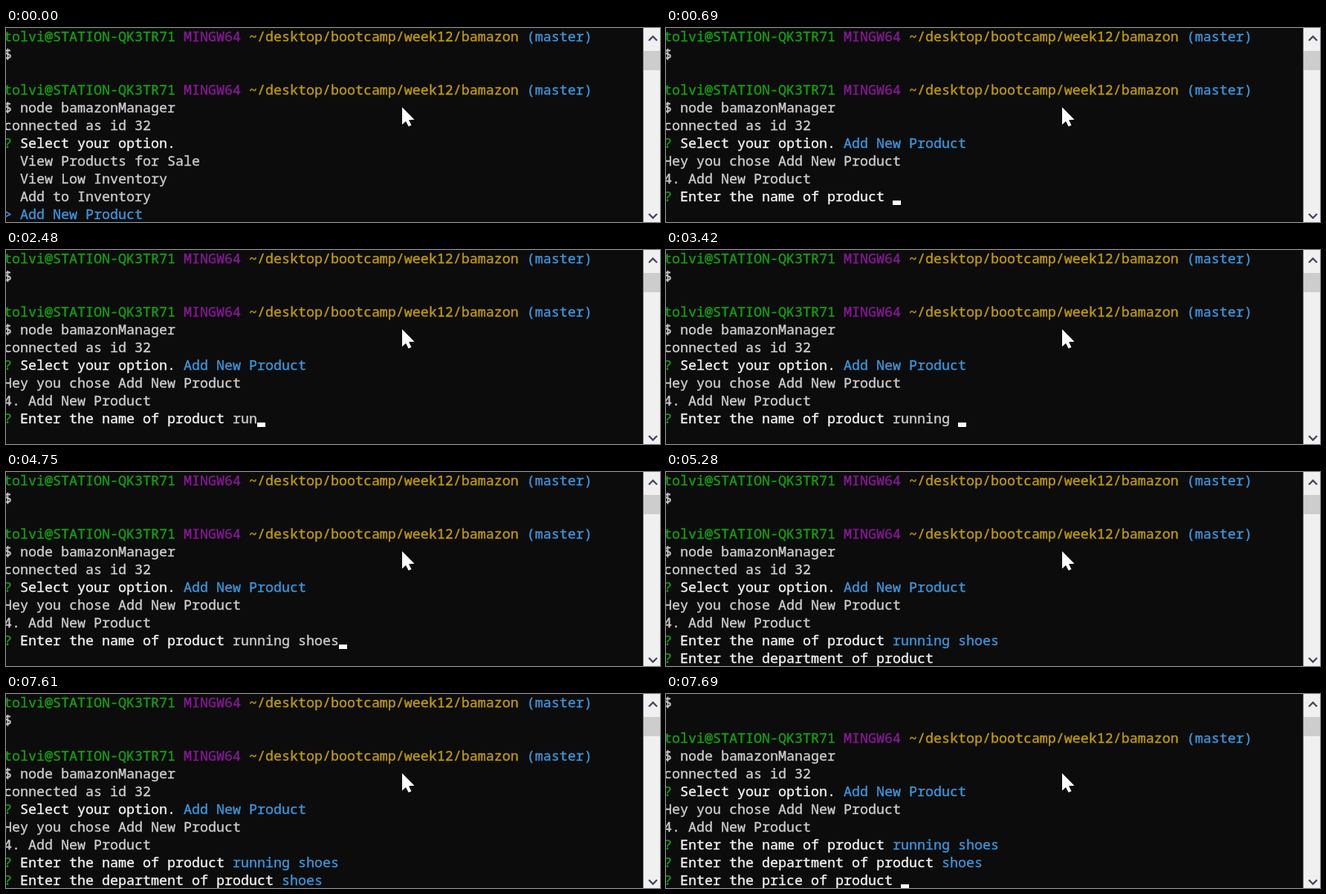
These frames come from a looping animation (880x262 px, 8000 ms). An HTML page:

```html
<!DOCTYPE html>
<html lang="en">
<head>
<meta charset="utf-8">
<title>Terminal session</title>
<style>
  html, body { margin: 0; width: 100%; height: 100%; overflow: hidden; background: #0c0c0c; }
  svg { display: block; }
  text { font: 18.333px "Noto Sans Mono", "DejaVu Sans Mono", monospace; white-space: pre; }
  tspan { fill: currentColor; stroke: currentColor; stroke-width: .4px; }
  .green { color: #13a10e; }
  .purple { color: #881798; }
  .yellow { color: #c19c00; }
  .cyan { color: #3a96dd; }
  .gray { color: #cccccc; }
  .white { color: #f2f2f2; }
</style>
</head>
<body>
<svg width="880" height="262" viewBox="0 0 880 262">
  <rect width="880" height="262" fill="#0c0c0c"/>
  <g id="screen"></g>
  <rect id="caret" width="11" height="6" fill="#fff"/>
  <rect x="857.5" width="22.5" height="262" fill="#f0f0f0"/>
  <rect x="858" y="31" width="22" height="26" fill="#cdcdcd"/>
  <path d="M865 17l5.5-5.5 5.5 5.5M865 251l5.5 5.5 5.5-5.5" fill="none" stroke="#404a60" stroke-width="2.4"/>
  <path d="M533 107v23.5l5-4.5 3.7 7 3.8-1.8-3.5-6.9 7.5-.6z" fill="#fff"/>
</svg>
<script>
const LOOP = 8000, CELL = 11, LINE = 24, LEFT = -3, BASE = 18, ROWS = 11;
const screen = document.getElementById('screen');
const caret = document.getElementById('caret');

const gray = text => [['gray', text]];
const ask = (question, style, answer) =>
  [['green', '? '], ['white', question + ' '], [style, answer]];

const prompt = [
  ['green', 'tolvi@STATION-QK3TR71 '], ['purple', 'MINGW64 '],
  ['yellow', '~/desktop/bootcamp/week12/bamazon '], ['cyan', '(master)']
];
const intro = [prompt, gray('$'), [], prompt, gray('$ node bamazonManager'), gray('connected as id 32')];
const choice = 'Add New Product';
const menu = [
  ask('Select your option.', 'gray', ''),
  gray('  View Products for Sale'),
  gray('  View Low Inventory'),
  gray('  Add to Inventory'),
  [['cyan', '> ' + choice]]
];
const chosen = [
  ask('Select your option.', 'cyan', choice),
  gray('Hey you chose ' + choice),
  gray('4. ' + choice)
];
const name = 'running shoes', department = 'shoes';

// Stages: menu, typing name, name accepted, typing department, department accepted, price
const MENU = 0, NAME = 1, NAMED = 2, DEPT = 3, PLACED = 4, PRICE = 5;

// [start ms, stage, letters typed, caret visible]
const steps = [
  [0, MENU, 0, 0],
  [690, NAME, 0, 1], [1160, NAME, 0, 0], [1560, NAME, 0, 1],
  [2020, NAME, 1, 0], [2100, NAME, 1, 1], [2250, NAME, 2, 1], [2480, NAME, 3, 1],
  [2650, NAME, 4, 1], [2880, NAME, 5, 1], [3020, NAME, 6, 0], [3100, NAME, 6, 1],
  [3250, NAME, 7, 1], [3420, NAME, 8, 1], [3570, NAME, 9, 0], [3630, NAME, 9, 1],
  [3880, NAME, 10, 1], [4110, NAME, 11, 0], [4180, NAME, 11, 1],
  [4580, NAME, 12, 1], [4750, NAME, 13, 1],
  [5200, NAMED, 0, 0],
  [5280, DEPT, 0, 0], [5600, DEPT, 0, 1], [6140, DEPT, 0, 0], [6540, DEPT, 1, 0],
  [6770, DEPT, 2, 1], [7000, DEPT, 3, 0], [7080, DEPT, 3, 1], [7170, DEPT, 4, 1],
  [7380, DEPT, 5, 1],
  [7610, PLACED, 0, 0],
  [7690, PRICE, 0, 1]
];

function buildRows(stage, typed) {
  if (stage === MENU) return [...intro, ...menu];
  const rows = [...intro, ...chosen];
  const field = (question, value, active) => rows.push(stage === active
    ? ask(question, 'gray', value.slice(0, typed))
    : ask(question, 'cyan', value));
  field('Enter the name of product', name, NAME);
  if (stage >= DEPT) field('Enter the department of product', department, DEPT);
  if (stage === PRICE) rows.push(ask('Enter the price of product', 'gray', ''));
  return rows.slice(-ROWS);
}

function draw([, stage, typed, visible]) {
  const rows = buildRows(stage, typed);
  screen.innerHTML = rows.map((row, i) =>
    `<text x="${LEFT}" y="${BASE + i * LINE}">` +
    row.map(([style, text]) => `<tspan class="${style}">${text.replace('>', '&gt;')}</tspan>`).join('') +
    '</text>').join('');
  const last = rows.length - 1;
  const column = rows[last].reduce((sum, [, text]) => sum + text.length, 0);
  caret.setAttribute('x', LEFT + column * CELL);
  caret.setAttribute('y', BASE + last * LINE - 1);
  caret.setAttribute('visibility', visible ? 'visible' : 'hidden');
}

let shown;
function tick() {
  const time = performance.now() % LOOP;
  const step = steps.findLast(([start]) => start <= time);
  if (step !== shown) draw(shown = step);
  requestAnimationFrame(tick);
}
tick();
</script>
</body>
</html>
```
